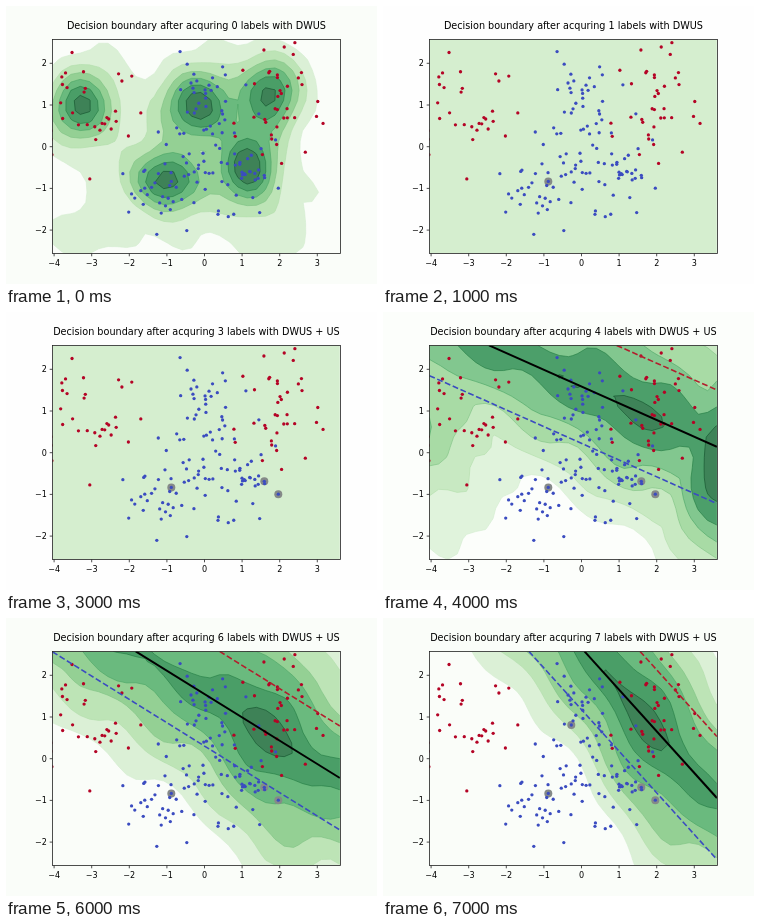
These frames come from a looping animation (371x278 px, 8000 ms). An HTML page with a canvas:

```html
<!DOCTYPE html>
<html lang="en">
<head>
<meta charset="utf-8">
<title>Decision boundary</title>
<style>
html, body { margin: 0; width: 100%; height: 100%; overflow: hidden; background: #fdfefc; }
canvas { display: block; width: 371px; height: 278px; }
</style>
</head>
<body>
<canvas id="plot"></canvas>
<script>
const W = 371, H = 278, STEP = 1000;
const box = { l: 46.4, t: 33.4, r: 333.9, b: 247.4 };
const BLUE = '#3b4cc0', RED = '#b40426';
const greens = ['#fafdf9', '#dbf0d6', '#bde4b6', '#94d094', '#6aba7e', '#4a9e67', '#3e8257'];
const paleGreens = ['#fcfefb', '#e0f3dc', '#c8e9c2', '#a8dba5', '#82c78f', '#4c9f6a', '#3e8358'];
const edges = ['', '#d4ecd0', '#b2ddac', '#7fc284', '#4aa565', '#227b42', '#114f2a'];

const canvas = document.getElementById('plot');
const ctx = canvas.getContext('2d');
const ratio = window.devicePixelRatio || 1;
canvas.width = Math.round(W * ratio);
canvas.height = Math.round(H * ratio);
ctx.scale(ratio, ratio);

// Fields map a pixel position to a contour level between 0 and 7.
const bump = (height, cx, cy, sx, sy = sx) => (x, y) =>
  height * Math.exp(-((x - cx) ** 2) / (2 * sx * sx) - ((y - cy) ** 2) / (2 * sy * sy));
const sum = (...fields) => (x, y) => fields.reduce((total, f) => total + f(x, y), 0);
const highest = (...fields) => (x, y) => Math.max(...fields.map(f => f(x, y)));
const wobble = (x, y) => .2 * Math.sin(x / 17 + y / 23) + .16 * Math.sin(x / 9 - y / 13);

// A boundary has a slope, a height at the right edge and a vertical gap to each margin.
const boundary = (slope, y, gap) => ({ slope, y, gap });
const lineY = (line, x) => line.y - line.slope * (box.r - x);

// Ridge along a boundary, with its crest around x = cx.
const ridge = (line, base, extra, cx, width, below, above) => (x, y) => {
  const h = lineY(line, x) - y;
  const crest = base + extra * Math.exp(-(((x - cx) / width) ** 2));
  return crest - (h < 0 ? -h * below : h * above);
};

const density = sum(
  bump(5.2, 75, 100, 22, 24), bump(5.6, 193, 100, 24), bump(5.4, 264, 86, 21, 26),
  bump(5.7, 243, 162, 20, 25), bump(5.7, 161, 175, 24, 21),
  bump(1.3, 200, 140, 90, 85), bump(.7, 80, 110, 40, 55),
  bump(1.3, 80, 228, 42, 17), bump(.8, 262, 225, 36, 32));

const line4 = boundary(.445, 134.8, 56.8);
const line5 = boundary(.337, 157, 43);
const line6 = boundary(.62, 160, 52);
const line7 = boundary(1.107, 180, 61.5);
const steepRidge = line => ridge(line, 5.3, 1.3, 260, 45, .036, .033);

const stages = [
  { field: density, shades: greens },
  {}, {}, {},
  {
    field: highest(ridge(line4, 5.75, .6, 245, 50, .042, .033),
      bump(4, 30, 95, 70, 85), bump(7, 345, 150, 45, 80)),
    shades: paleGreens, line: line4
  },
  {
    field: highest(ridge(line5, 5.6, .8, 200, 90, .06, .04),
      bump(7, 55, 45, 60, 45), bump(2.3, 35, 185, 55), bump(3.9, 335, 245, 40, 60)),
    shades: paleGreens, line: line5
  },
  { field: steepRidge(line6), shades: greens, line: line6 },
  { field: steepRidge(line7), shades: greens, line: line7 }
];

const COLS = 31, ROWS = 21;
const gridX = i => box.l + (box.r - box.l) * i / COLS;
const gridY = j => box.t + (box.b - box.t) * j / ROWS;

// Marching squares: the area above a level, and its outline.
function contour(field, level) {
  const area = new Path2D(), outline = new Path2D();
  const node = (i, j) => {
    const x = gridX(i), y = gridY(j);
    return { x, y, v: field(x, y) + wobble(x, y) - level };
  };
  for (let j = 0; j < ROWS; j++) for (let i = 0; i < COLS; i++) {
    const corners = [node(i, j), node(i + 1, j), node(i + 1, j + 1), node(i, j + 1)];
    const shape = [], crossings = [];
    corners.forEach((a, k) => {
      const b = corners[(k + 1) % 4];
      if (a.v >= 0) shape.push(a);
      if ((a.v >= 0) !== (b.v >= 0)) {
        const f = a.v / (a.v - b.v);
        const p = { x: a.x + (b.x - a.x) * f, y: a.y + (b.y - a.y) * f };
        shape.push(p);
        crossings.push(p);
      }
    });
    shape.forEach((p, k) => k ? area.lineTo(p.x, p.y) : area.moveTo(p.x, p.y));
    if (shape.length) area.closePath();
    crossings.forEach((p, k) => k % 2 ? outline.lineTo(p.x, p.y) : outline.moveTo(p.x, p.y));
  }
  return { area, outline };
}
for (const stage of stages) {
  stage.contours = stage.field ? [1, 2, 3, 4, 5, 6].map(level => contour(stage.field, level)) : [];
}

function makeRandom(seed) {
  return () => (seed = (seed * 16807) % 2147483647) / 2147483647;
}
const random = makeRandom(4211);
function cluster(n, cx, cy, sx, sy) {
  return Array.from({ length: n }, () => {
    const r = Math.min(2.2, Math.sqrt(-2 * Math.log(random())));
    const a = random() * 2 * Math.PI;
    return { x: cx + sx * r * Math.cos(a), y: cy + sy * r * Math.sin(a) };
  });
}
const labelled = [
  { from: 1, x: 165.3, y: 175.4 }, { from: 2, x: 272.3, y: 182.2 },
  { from: 3, x: 258.3, y: 169.3 }, { from: 7, x: 188.3, y: 107 }
];
const redPoints = [...cluster(37, 82, 107, 24, 30), ...cluster(38, 268, 93, 24, 30)];
const bluePoints = [
  ...labelled, ...cluster(41, 160, 178, 20, 24),
  ...cluster(38, 197, 96, 26, 25), ...cluster(37, 236, 168, 20, 24)
];

function dot({ x, y }, r, color) {
  ctx.fillStyle = color;
  ctx.beginPath();
  ctx.arc(x, y, r, 0, 2 * Math.PI);
  ctx.fill();
}

function stroke(x1, y1, x2, y2, color, width, dash = []) {
  ctx.strokeStyle = color;
  ctx.lineWidth = width;
  ctx.setLineDash(dash);
  ctx.beginPath();
  ctx.moveTo(x1, y1);
  ctx.lineTo(x2, y2);
  ctx.stroke();
  ctx.setLineDash([]);
}

function drawContours({ contours, shades }) {
  ctx.fillStyle = shades ? shades[0] : '#d5eecf';
  ctx.fillRect(box.l, box.t, box.r - box.l, box.b - box.t);
  ctx.lineWidth = .6;
  contours.forEach(({ area, outline }, i) => {
    ctx.fillStyle = shades[i + 1];
    ctx.strokeStyle = edges[i + 1];
    ctx.fill(area);
    ctx.stroke(outline);
  });
}

function drawBoundary(line) {
  const rule = (offset, color, width, dash) => {
    const right = line.y + offset;
    const x = Math.max(box.l, box.r - (right - box.t) / line.slope);
    stroke(x, lineY(line, x) + offset, box.r, right, color, width, dash);
  };
  rule(0, '#000', 2);
  rule(line.gap, BLUE, 1.6, [5.9, 2.6]);
  rule(-line.gap, '#b21f2d', 1.6, [5.9, 2.6]);
}

function drawAxes() {
  ctx.strokeStyle = '#222';
  ctx.lineWidth = .8;
  ctx.strokeRect(46.5, 33.5, 288, 214);
  ctx.fillStyle = '#000';
  ctx.font = '8.05px "DejaVu Sans", sans-serif';
  const text = v => v < 0 ? '\u2212' + -v : String(v);
  ctx.textAlign = 'center';
  for (let v = -4; v <= 3; v++) {
    const x = 198.5 + v * 37.6;
    stroke(x, 247.5, x, 250.3, '#222', .8);
    ctx.fillText(text(v), x, 260);
  }
  ctx.textAlign = 'right';
  for (let v = -2; v <= 2; v++) {
    const y = 140.7 - v * 41.7;
    stroke(43.7, y, 46.5, y, '#222', .8);
    ctx.fillText(text(v), 40.8, y + 3);
  }
}

function draw(count) {
  const stage = stages[count];
  ctx.fillStyle = stage.shades ? stage.shades[0] : '#fefefe';
  ctx.fillRect(0, 0, W, H);
  ctx.save();
  ctx.beginPath();
  ctx.rect(box.l, box.t, box.r - box.l, box.b - box.t);
  ctx.clip();
  drawContours(stage);
  for (const p of labelled) if (count >= p.from) dot(p, 4, '#858a88');
  for (const p of bluePoints) dot(p, 1.65, BLUE);
  for (const p of redPoints) dot(p, 1.65, RED);
  if (stage.line) drawBoundary(stage.line);
  ctx.restore();
  drawAxes();
  ctx.textAlign = 'center';
  ctx.font = '9.67px "DejaVu Sans", sans-serif';
  const method = count > 1 ? 'DWUS + US' : 'DWUS';
  ctx.fillText(`Decision boundary after acquring ${count} labels with ${method}`, 190.4, 23);
}

const start = performance.now();
function tick() {
  const elapsed = performance.now() - start;
  draw(Math.floor(elapsed / STEP) % stages.length);
  requestAnimationFrame(tick);
}
tick();
</script>
</body>
</html>
```
